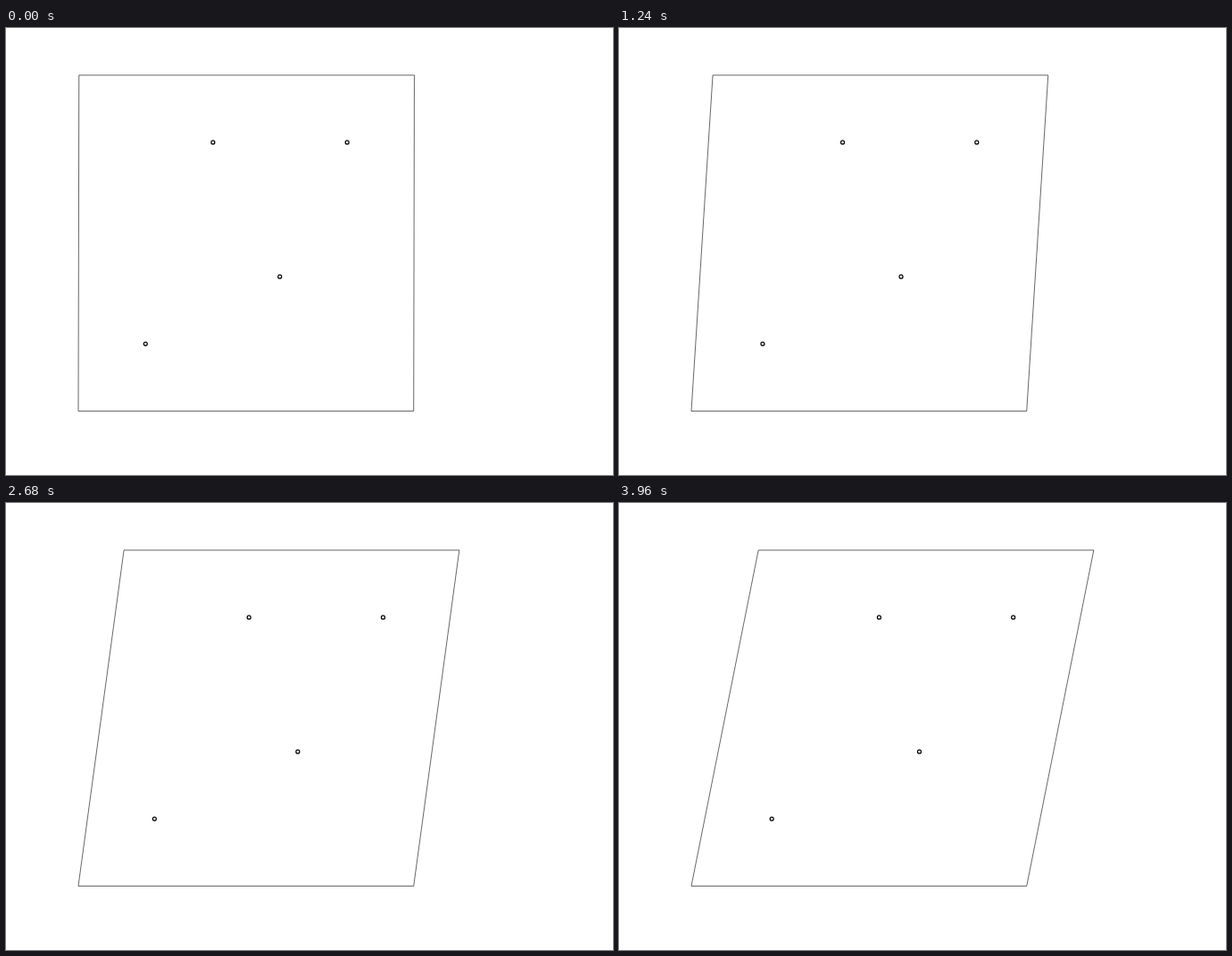
An HTML page with a canvas for the animation above (4 s loop, 680 by 500 pixels).

```html
<!DOCTYPE html>
<html>
<head>
<meta charset="utf-8">
<style>
  html, body { margin: 0; width: 100%; height: 100%; overflow: hidden; background: #fff; }
  canvas { display: block; }
</style>
</head>
<body>
<canvas id="stage" width="680" height="500"></canvas>
<script>
const ctx = document.getElementById('stage').getContext('2d');
const STEP = 40, STEPS = 100, MAX_SHEAR = 0.2;
const LEFT = 81, BOTTOM = 428.5, SIDE = 375.7;
const corners = [[0, 0], [1, 0], [1, 1], [0, 1]];
const points = [[0.2, 0.2], [0.4, 0.8], [0.6, 0.4], [0.8, 0.8]];

// Unit-square coordinates to sheared stage pixels
const place = ([x, y], shear) => [LEFT + SIDE * (x + shear * y), BOTTOM - SIDE * y];

function draw(shear) {
  ctx.fillStyle = '#fff';
  ctx.fillRect(0, 0, 680, 500);

  ctx.beginPath();
  corners.forEach(corner => ctx.lineTo(...place(corner, shear)));
  ctx.closePath();
  ctx.strokeStyle = '#000';
  ctx.lineWidth = 0.6;
  ctx.stroke();

  ctx.lineWidth = 1.2;
  for (const point of points) {
    ctx.beginPath();
    ctx.arc(...place(point, shear), 2, 0, 2 * Math.PI);
    ctx.stroke();
  }
}

function tick() {
  const step = Math.floor(performance.now() / STEP) % STEPS;
  draw(MAX_SHEAR * (step + 1) / STEPS);
  requestAnimationFrame(tick);
}
tick();
</script>
</body>
</html>
```
